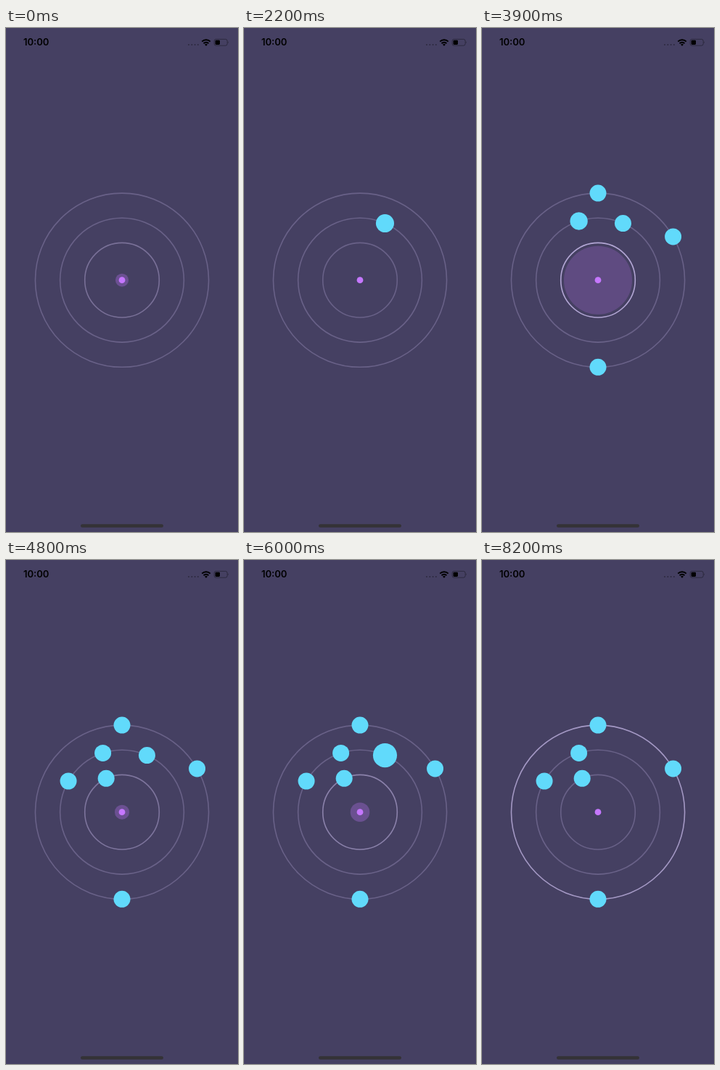
Animation, 320 px wide and 693 px high, one loop 8.3 s. Source, as an HTML page:

```html
<!DOCTYPE html>
<html lang="en">
<head>
<meta charset="utf-8">
<title>Radar pulse</title>
<style>
  html, body { margin: 0; width: 100%; height: 100%; overflow: hidden; background: #454062; }
  svg { display: block; width: 100%; height: 100%; }
  .clock { font: 600 13px Inter, Roboto, sans-serif; }
  .ring { fill: none; stroke: #d2c4f5; stroke-width: 1.6; }
  .node { fill: #61dafb; }
</style>
</head>
<body>
<svg viewBox="0 0 320 693">
  <text class="clock" x="24" y="24.4">10:00</text>
  <g fill="#000" fill-opacity=".35">
    <circle cx="252" cy="23" r="1"/><circle cx="256.3" cy="23" r="1"/>
    <circle cx="260.6" cy="23" r="1"/><circle cx="264.9" cy="23" r="1"/>
  </g>
  <g fill="none" stroke="#000" stroke-width="2">
    <path d="M270.3 18.6a8 8 0 0 1 11.4 0M272.6 21.2a4.8 4.8 0 0 1 6.8 0"/>
    <path d="M276 24.8l-1.9-2a2.7 2.7 0 0 1 3.8 0z" fill="#000" stroke="none"/>
  </g>
  <rect x="287.2" y="15.4" width="18" height="8.8" rx="2.5" fill="none" stroke="#000" stroke-opacity=".4" stroke-width=".9"/>
  <rect x="288.6" y="16.7" width="6.4" height="6.2" rx="1.3"/>
  <path d="M306.2 18.3q1.4 1.5 0 3z" fill-opacity=".45"/>
  <rect x="103" y="682.3" width="114" height="4.4" rx="2.2" fill="#343236"/>
  <g id="scene" transform="translate(160 346.7)"></g>
</svg>
<script>
const LOOP = 8300, PULSE = 1100, REACH = 120;
const pulseStarts = [-179, 940, 2242, 3426, 4610, 5777, 7137];
const rings = [
  { r: 51.3, peak: .38, rise: .25, fall: .27 },
  { r: 85.4, peak: .72, rise: .25, fall: .2 },
  { r: 119.6, peak: .9, rise: .25, fall: .15 }
];
// ring index, angle in degrees, entry time, exit time
const nodes = [
  [1, -66.2, 1900, 5840],
  [2, -30, 2450],
  [2, 90, 3030],
  [2, -90, 3420],
  [1, -108, 3740],
  [1, -150, 4030],
  [0, -115.2, 4310]
].map(([ring, angle, enter, leave = Infinity]) => ({ ring, angle, enter, leave }));

const scene = document.getElementById('scene');
const clamp = (v) => Math.min(1, Math.max(0, v));

function circle(attrs) {
  const el = document.createElementNS('http://www.w3.org/2000/svg', 'circle');
  for (const name in attrs) el.setAttribute(name, attrs[name]);
  return scene.appendChild(el);
}

const pulse = circle({ fill: '#c577ff' });
for (const ring of rings) ring.el = circle({ class: 'ring', r: ring.r });
circle({ r: 4.4, fill: '#c577ff' });
for (const node of nodes) {
  const a = node.angle * Math.PI / 180, r = rings[node.ring].r;
  node.el = circle({ class: 'node', cx: r * Math.cos(a), cy: r * Math.sin(a) });
}

// cubic-bezier(.42, 0, 1, 1), solved by bisection
function easeIn(x) {
  let lo = 0, hi = 1;
  for (let i = 0; i < 20; i++) {
    const s = (lo + hi) / 2, q = 1 - s;
    if (1.26 * q * q * s + 3 * q * s * s + s ** 3 < x) lo = s; else hi = s;
  }
  return 3 * lo * lo - 2 * lo ** 3;
}
const easeInOut = (p) => p < .5 ? easeIn(2 * p) / 2 : 1 - easeIn(2 - 2 * p) / 2;

function glow(p, { peak, rise, fall }) {
  const d = p - peak;
  return Math.sin(Math.PI / 2 * clamp(1 - Math.abs(d) / (d < 0 ? rise : fall)));
}

function popIn(p) {
  const u = p - 1;
  return 1 + 3 * u ** 3 + 2 * u * u;
}

function nodeScale(t, { enter, leave }) {
  if (t < enter) return 0;
  if (t < leave) return popIn(clamp((t - enter) / 420));
  const p = clamp((t - leave) / 460);
  return p < .4 ? 1 + .45 * Math.sin(p / .4 * Math.PI / 2)
                : 1.45 * (1 - ((p - .4) / .6) ** 2);
}

function draw(t) {
  const start = pulseStarts.filter((s) => s <= t).pop();
  const p = (t - start) / PULSE, e = easeInOut(clamp(p));
  pulse.setAttribute('r', REACH * e);
  pulse.setAttribute('opacity', .33 * (1 - e));
  for (const ring of rings) ring.el.setAttribute('opacity', .25 + .55 * glow(p, ring));
  for (const node of nodes) node.el.setAttribute('r', 11.5 * Math.max(0, nodeScale(t, node)));
}

const began = performance.now();
function tick() {
  draw((performance.now() - began) % LOOP);
  requestAnimationFrame(tick);
}
tick();
</script>
</body>
</html>
```
